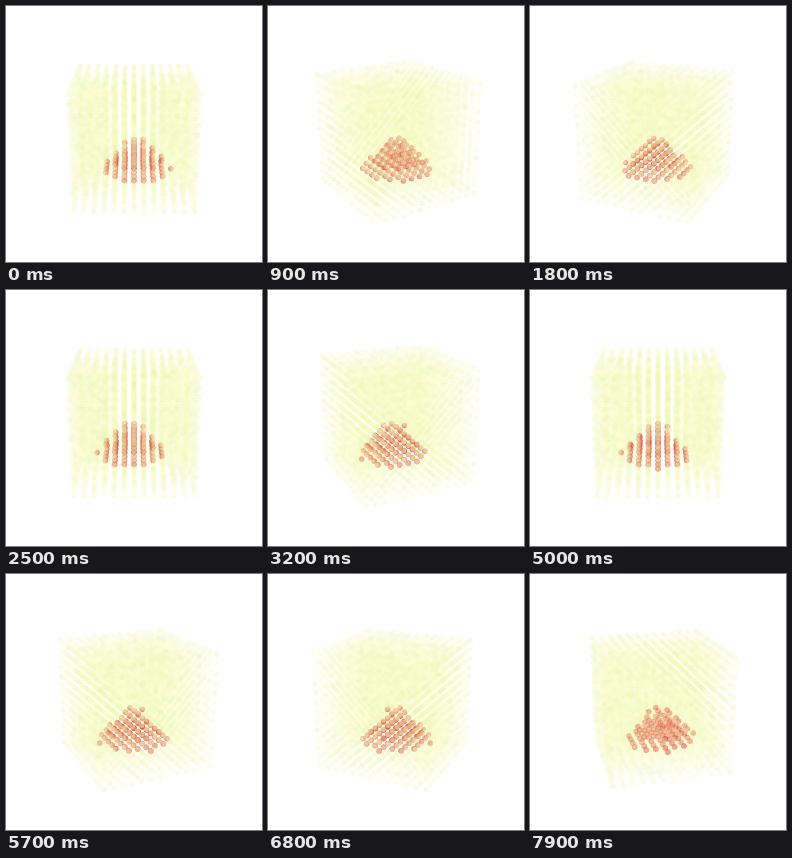
These frames come from a looping animation (256x256 px, 8000 ms). A matplotlib script:

```python
import numpy as np
import matplotlib.pyplot as plt
from matplotlib.animation import FuncAnimation

SIZE, DPI = 256, 100
FRAMES, STEP_MS = 80, 100
TURN = np.radians(3.6)          # rotation per frame
N = 13                          # lattice points per side
ELEV = np.radians(20)
FOCAL, DIST = 522, 9.2
CENTER = 128, 128
DOT = 0.09                      # dot diameter in lattice half-widths

rng = np.random.default_rng(4)

# Cubic lattice with a small cone of hot points in its lower half
i, j, k = (a.ravel() for a in np.meshgrid(*[np.arange(N)] * 3, indexing="ij"))
x, y, z = (2 * a / (N - 1) - 1 for a in (i, j, k))
radius = 3.85 - 0.85 * (k - 2)
hot = (k >= 2) & (k <= 5) & (np.hypot(i - 6.2, j - 6.2) <= radius)

value = np.clip(0.525 + 0.025 * rng.standard_normal(N ** 3), 0.42, 0.6)
face = plt.get_cmap("RdYlGn")(value)
face[:, 3] = 0.28
edge = face.copy()
edge[:, 3] = 0
heat = rng.uniform(0, 1, hot.sum())
face[hot] = np.column_stack([0.94 - 0.06 * heat, 0.50 - 0.17 * heat,
                             0.37 - 0.10 * heat, np.full(heat.size, 0.6)])
edge[hot] = (0.78, 0.18, 0.16, 0.5)

fig = plt.figure(figsize=(SIZE / DPI, SIZE / DPI), dpi=DPI, facecolor="white")
ax = fig.add_axes([0, 0, 1, 1])
ax.set(xlim=(0, SIZE), ylim=(SIZE, 0))
ax.axis("off")
dots = ax.scatter(x, y, s=10, linewidths=0.35)


def project(angle):
    c, s = np.cos(angle), np.sin(angle)
    px, py = x * c - y * s, x * s + y * c
    near = z * np.sin(ELEV) - py * np.cos(ELEV)
    up = z * np.cos(ELEV) + py * np.sin(ELEV)
    scale = FOCAL / (DIST - near)
    return CENTER[0] + px * scale, CENTER[1] - up * scale, scale, near


def draw(frame):
    sx, sy, scale, near = project(frame * TURN)
    order = np.argsort(near, kind="stable")
    dots.set_offsets(np.column_stack([sx, sy])[order])
    dots.set_sizes((DOT * scale[order] * 72 / DPI) ** 2)
    dots.set_facecolor(face[order])
    dots.set_edgecolor(edge[order])
    return (dots,)


anim = FuncAnimation(fig, draw, frames=FRAMES, interval=STEP_MS,
                     repeat=True, repeat_delay=0, blit=False)
plt.show()
```
